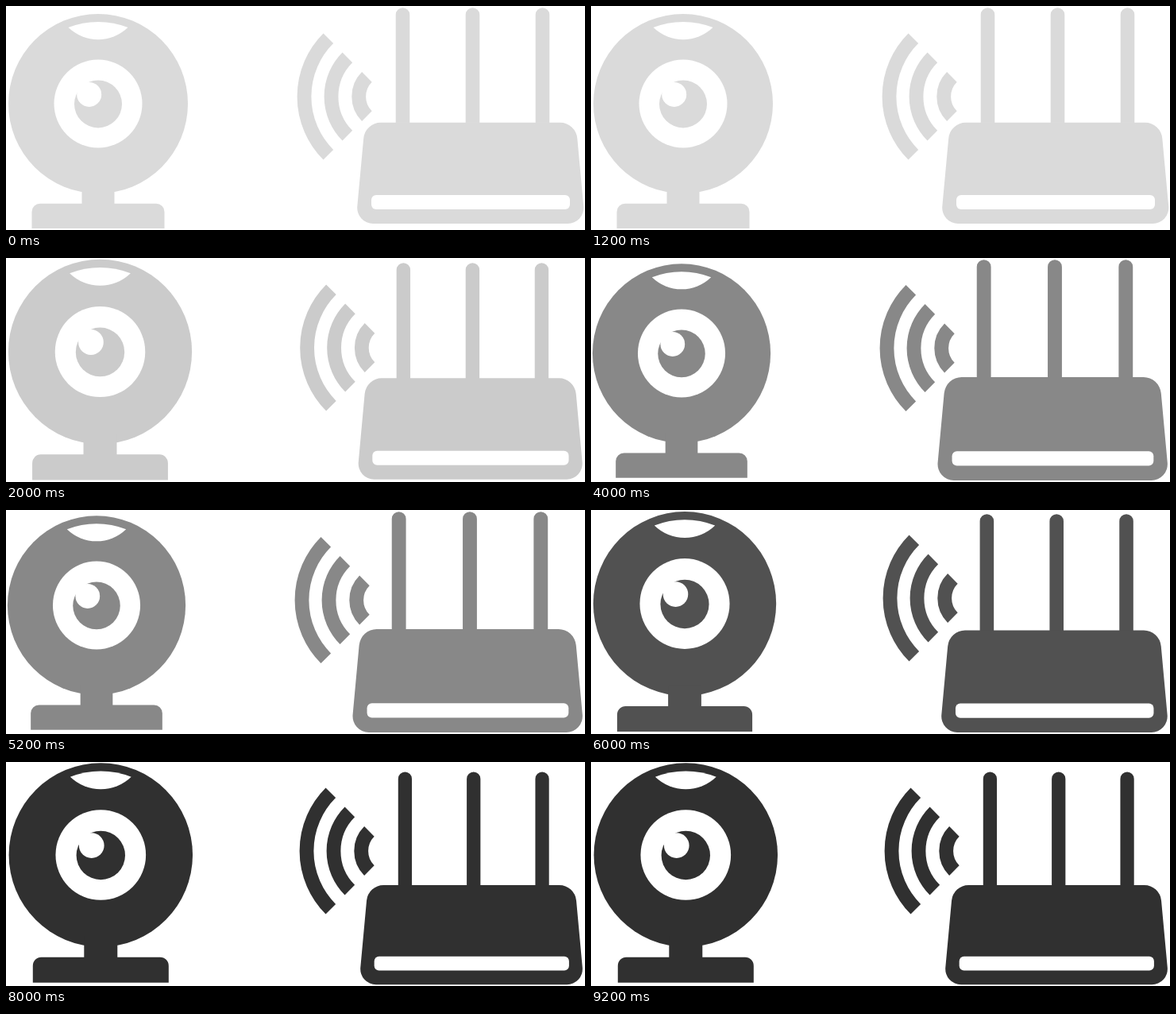
These frames come from a looping animation (729x282 px, 10 s). An HTML page:

```html
<!DOCTYPE html>
<html lang="en">
<head>
<meta charset="utf-8">
<title>Camera and router</title>
<style>
  html, body { margin: 0; width: 100%; height: 100%; overflow: hidden; background: #fff; }
  svg { display: block; width: 729px; height: 282px; }
  .hole { fill: #fff; }
  #camera, #router { filter: blur(.6px); }
</style>
</head>
<body>
<svg id="stage" viewBox="0 0 729 282">
  <g id="camera">
    <circle r="113"/>
    <path d="M-20.5 100H20.5V125.7H73A10.5 10.5 0 0 1 83.5 136.2V157H-83.5V136.2A10.5 10.5 0 0 1 -73 125.7H-20.5Z"/>
    <path class="hole" d="M-37.5 -96A103 103 0 0 1 37.5 -96A54 54 0 0 1 -37.5 -96Z"/>
    <circle class="hole" r="55.5"/>
    <circle cy=".4" r="30"/>
    <circle class="hole" cx="-11.3" cy="-11.6" r="15.5"/>
  </g>
  <g id="waves" fill="none" stroke-width="17.8"></g>
  <g id="router">
    <path d="M57.5 9V150M145.5 9V150M233.5 9V150" stroke-width="17.6" stroke-linecap="round"/>
    <path d="M30 144.8H255.5A22 22 0 0 1 277.3 164.7L285.2 250A20 20 0 0 1 265.2 272H20.3A20 20 0 0 1 .3 250L8.2 164.7A22 22 0 0 1 30 144.8Z" stroke="none"/>
    <rect class="hole" x="18" y="236" width="250" height="18" rx="6" stroke="none"/>
  </g>
</svg>
<script>
const HOLD = 2000;

// camera and router: x, y, scale x, scale y; waves: x, y of the shared centre
const poses = [
  { color: '#dadada', camera: [116, 123, 1, 1], waves: [479, 114], router: [442, 2, 1, 1] },
  { color: '#cbcbcb', camera: [118.5, 118, 1.023, 1.029], waves: [482.6, 113], router: [443.5, 6, .989, 1.003] },
  { color: '#888888', camera: [114, 120, .992, .998], waves: [476, 113.5], router: [436.3, 2, 1.015, 1.022] },
  { color: '#515151', camera: [118, 118, 1.019, 1.026], waves: [480, 111], router: [441, 5, .998, 1.011] },
  { color: '#303030', camera: [119.3, 117, 1.024, 1.024], waves: [482, 112], router: [446, 12.3, .981, .985] }
];

const byId = id => document.getElementById(id);
const stage = byId('stage');

// quarter arcs opening to the right
byId('waves').innerHTML = [103.5, 69.5, 34.8].map(r => {
  const d = r * Math.SQRT1_2;
  return `<path d="M${-d} ${-d}A${r} ${r} 0 0 0 ${-d} ${d}"/>`;
}).join('');

function place(id, [x, y, sx = 1, sy = 1]) {
  byId(id).setAttribute('transform', `translate(${x} ${y}) scale(${sx} ${sy})`);
}

let shown = -1;
function draw() {
  const index = Math.floor(performance.now() / HOLD) % poses.length;
  if (index !== shown) {
    shown = index;
    const pose = poses[index];
    stage.setAttribute('fill', pose.color);
    for (const id of ['waves', 'router']) byId(id).setAttribute('stroke', pose.color);
    for (const id of ['camera', 'waves', 'router']) place(id, pose[id]);
  }
  requestAnimationFrame(draw);
}
draw();
</script>
</body>
</html>
```
